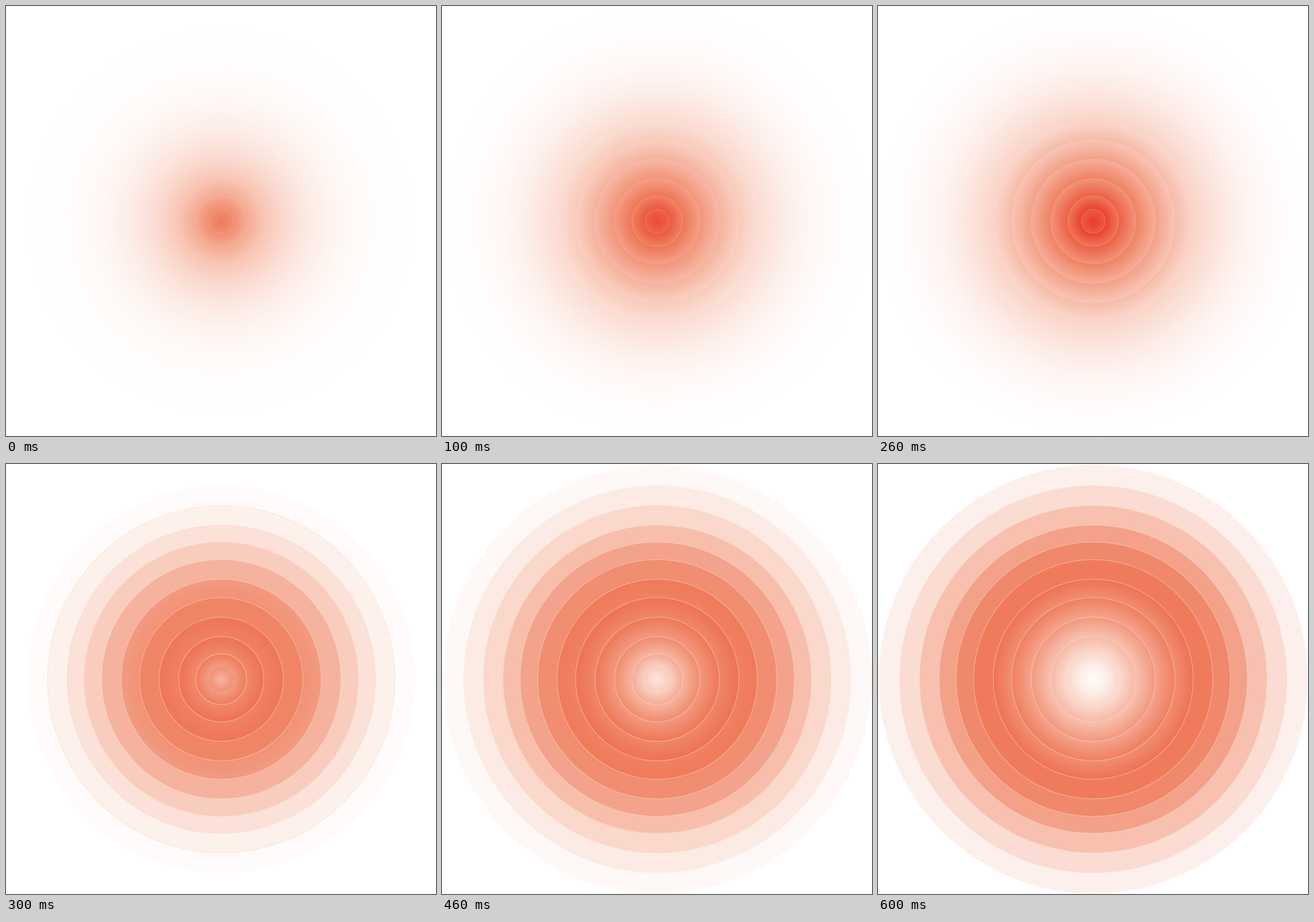
Write an HTML page with a canvas that moves like this. It is 748 px wide and 748 px high and loops after 0.7 s.

```html
<!DOCTYPE html>
<html lang="en">
<head>
<meta charset="utf-8">
<title>Radial pulse</title>
<style>
  html, body { margin: 0; width: 100%; height: 100%; overflow: hidden; background: #fff; }
  canvas { display: block; width: 748px; height: 748px; }
</style>
</head>
<body>
<canvas id="stage" width="748" height="748"></canvas>
<script>
const ctx = document.getElementById('stage').getContext('2d');
const SIZE = 748, CENTER = 374.4, STEP_MS = 100;
const STEPS = 7, GLOW_STEPS = 3;
const RADII = [21, 44, 74, 108, 142, 174, 208, 238.5, 268, 302, 337, 373];
const SHADED = 6; // bands inside this edge have relief, those beyond are plain

// Heat ramp from white to red: [heat, r, g, b]
const RAMP = [[0, 255, 255, 255], [30, 249, 208, 194], [70, 239, 126, 94], [100, 232, 60, 42]];

function heatColor(heat) {
  const h = Math.min(100, Math.max(0, heat));
  const i = Math.max(1, RAMP.findIndex(key => key[0] >= h));
  const low = RAMP[i - 1], high = RAMP[i];
  const mix = (h - low[0]) / (high[0] - low[0]);
  const rgb = [1, 2, 3].map(c => Math.round(low[c] + (high[c] - low[c]) * mix));
  return `rgb(${rgb})`;
}

// Heat of the growing glow; edge counts rings from the center.
function glowHeat(step, edge) {
  const left = (GLOW_STEPS - 1 - step) ** 2;
  const peak = 100 - 7 * left, reach = 5.2 - 0.35 * left;
  const fade = 1 - (edge / RADII.length) ** 4;
  return peak * Math.exp(-((edge / reach) ** 1.5)) * fade;
}

// Heat of the outgoing wave: a crest that slows down, with a cosine slope on both sides.
function waveHeat(step, edge) {
  const crest = 6.3 - 0.36 * (STEPS - 1 - step) ** 2;
  const x = edge - crest;
  const width = x < 0 ? 7 : 10.3 - 0.53 * step;
  return Math.abs(x) < width ? 72 * Math.cos(Math.PI * x / width / 2) ** 2 : 0;
}

// Inner and outer heat of one band.
function bandHeat(step, band) {
  const glowing = step < GLOW_STEPS;
  const heat = glowing ? glowHeat : waveHeat;
  if (!glowing && band >= SHADED) {
    const flat = heat(step, band + 0.75);
    return [flat, flat];
  }
  const relief = band >= SHADED ? 0 : glowing ? -0.03 * step : 0.05;
  const inner = heat(step, band) * (band ? 1 - relief : 1);
  return [inner, heat(step, band + 1) * (1 + relief)];
}

function makeFill(step) {
  const fill = ctx.createRadialGradient(CENTER, CENTER, 0, CENTER, CENTER, SIZE / 2);
  const stop = (r, heat) => fill.addColorStop(Math.min(1, r / (SIZE / 2)), heatColor(heat));
  RADII.forEach((radius, band) => {
    const [inner, outer] = bandHeat(step, band);
    stop(band ? RADII[band - 1] + 0.4 : 0, inner);
    stop(radius - 0.4, outer);
  });
  stop(RADII[RADII.length - 1] + 0.5, 0);
  return fill;
}

const fills = Array.from({ length: STEPS }, (_, step) => makeFill(step));

function draw(step) {
  const glowing = step < GLOW_STEPS;
  ctx.globalAlpha = 1;
  ctx.fillStyle = fills[step];
  ctx.fillRect(0, 0, SIZE, SIZE);
  ctx.globalAlpha = glowing ? 0.17 : 0.5;
  ctx.strokeStyle = '#fcd8bf';
  ctx.lineWidth = 1.3;
  for (const r of glowing ? RADII.slice(0, SHADED) : RADII.slice(1, 10)) {
    ctx.beginPath();
    ctx.arc(CENTER, CENTER, r, 0, Math.PI * 2);
    ctx.stroke();
  }
}

function tick() {
  draw(Math.floor(performance.now() / STEP_MS) % STEPS);
  requestAnimationFrame(tick);
}
tick();
</script>
</body>
</html>
```
